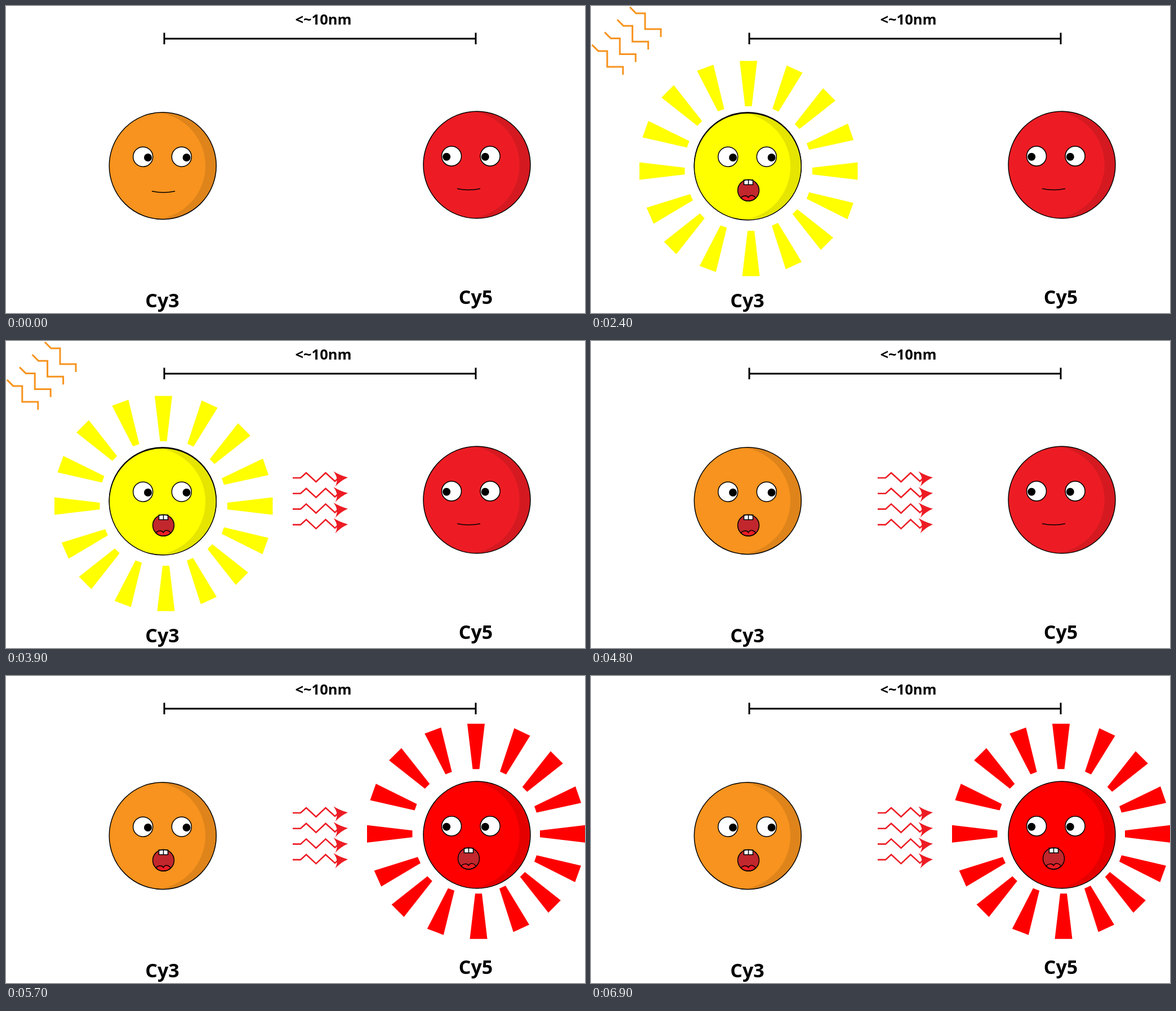
An HTML page for the animation above (7.2 s loop, 1028x545 px).

```html
<!DOCTYPE html>
<html lang="en">
<head>
<meta charset="utf-8">
<title>Energy transfer from Cy3 to Cy5</title>
<style>
  html, body { margin: 0; width: 100%; height: 100%; overflow: hidden; background: #fff; }
  svg { display: block; width: 100%; height: 100%; }
  text { font: bold 34px "Open Sans", "Noto Sans", sans-serif; text-anchor: middle; }
  .ink { stroke: #000; stroke-width: 1.5; }
  .wave { fill: none; stroke-miterlimit: 10; }
</style>
</head>
<body>
<svg viewBox="0 0 1028 545">
  <text x="563.5" y="33" style="font-size:25.5px">&lt;~10nm</text>
  <path d="M281 58H834M281 47.5V68M834 47.5V68" stroke="#000" stroke-width="3"/>
  <text x="277.5" y="535">Cy3</text>
  <text x="834" y="529">Cy5</text>
  <g id="scene"></g>
</svg>
<script>
const STEP = 300;
const COUNT = 24;

// How much of each wave is drawn at every step
const lightStages = '012344123441234000000000';
const transferStages = '000000000001231231231233';

const lightPoints = [[69, 2], [80, 13], [96, 13], [96, 41], [124, 41], [124, 55], [124, 67], [134, 67]];
const lightLengths = [0, 3, 4, 6, 8];
const transferPoints = [[509, 243], [523, 243], [533, 234], [550.5, 250], [567.5, 234], [584, 249], [590, 243.5]];
const transferLengths = [0, 3, 5, 7];

// Inner end and heading of each ray
const rays = [
  [279.5, 178, 0], [327.5, 185, 25], [366, 214, 45], [385, 249.5, 71],
  [393, 293, 90], [385, 336.5, 110], [362, 365, 135], [326.5, 387.5, 155.5],
  [284, 399, 180], [235.5, 391.5, 200.5], [197.5, 372.5, 225], [178.5, 339.5, 246],
  [166.5, 293, 270], [172.5, 245.5, 289.5], [193, 208.5, 315], [231, 185, 339.5]
];

const at = (x, y, content) => `<g transform="translate(${x} ${y})">${content}</g>`;

const ball = (x, y, color) => at(x, y, `
  <circle r="95" fill="${color}"/>
  <path d="M-9.5-94.5A95 95 0 1 1-9.5 94.5A95 95 0 0 0-9.5-94.5" fill-opacity=".1"/>
  <circle r="95" fill="none" class="ink"/>`);

const eye = (x, y, look) => at(x, y, `
  <circle r="17.5" fill="#fff" class="ink"/>
  <circle cx="${look}" cy="1.3" r="7"/>`);

const closedMouth = '<path d="M-20.5 1.5Q0 6 20.5 1.5" fill="none" class="ink"/>';
const openMouth = `
  <circle r="19" fill="#c1272d"/>
  <path d="M-13.5 13.5C-10 9-3 8 0 12.5C3 7 9 8 13 13.5A19 19 0 0 1-13.5 13.5Z" fill="#ed1c24" class="ink"/>
  <path d="M-8-18.5H8V-10H-8ZM0-18.5V-10" fill="#fff" class="ink"/>
  <circle r="19" fill="none" class="ink"/>`;

const face = (eyeX, eyeY, look, mouthX, mouthY, open) =>
  eye(eyeX, eyeY, look) + eye(eyeX + 68.6, eyeY, look) +
  at(mouthX, mouthY, open ? openMouth : closedMouth);

const burst = (dx, dy, color) => at(dx, dy, rays.map(([x, y, angle]) =>
  `<path d="M-6 0L-15.5-80.5H15.5L6 0Z" fill="${color}" transform="translate(${x} ${y}) rotate(${angle})"/>`
).join(''));

function waves(points, length, head, dx, dy, color, width) {
  if (!length) return '';
  const wave = `<polyline class="wave" points="${points.slice(0, length).join(' ')}" stroke="${color}" stroke-width="${width}"/>` +
    (length === points.length ? `<path d="${head}" fill="${color}"/>` : '');
  return [0, 1, 2, 3].map(i => at(i * dx, i * dy, wave)).join('');
}

function draw(step) {
  const donorLit = step >= 6 && step <= 14;
  const donorRays = [6, 8, 10, 11, 13].includes(step);
  const acceptorLit = step >= 17;
  const acceptorRays = acceptorLit && step % 2 === 1;

  return waves(lightPoints, lightLengths[lightStages[step]],
      'M149 80Q142 68 140.5 54Q138 62 133 66Q129 70 121.5 71.5Q136 73 149 80Z',
      -22.4, 22.3, '#f7931e', 3) +
    (donorRays ? burst(0, 0, '#ff0') : '') +
    ball(278.3, 283.7, '#f7931e') +
    (donorLit ? ball(278.3, 285, '#ff0') : '') +
    face(243.2, 267.7, 8.8, 279.5, 327.3, step >= 5) +
    waves(transferPoints, transferLengths[transferStages[step]],
      'M607 242.3Q594 239 581.5 231.5Q587 239 587.5 245Q588 252 584.5 258.5Q594 248 607 242.3Z',
      0, 27.7, '#ed1c24', 2.6) +
    (acceptorRays ? burst(555, -12.7, '#f00') : '') +
    ball(836, 282, acceptorLit ? '#f00' : '#ed1c24') +
    face(791, 266.5, -8.8, 821.5, acceptorLit ? 324 : 322.8, acceptorLit);
}

const scene = document.getElementById('scene');
let shown = -1;

function tick() {
  const step = Math.floor(performance.now() / STEP) % COUNT;
  if (step !== shown) {
    scene.innerHTML = draw(step);
    shown = step;
  }
  requestAnimationFrame(tick);
}
tick();
</script>
</body>
</html>
```
